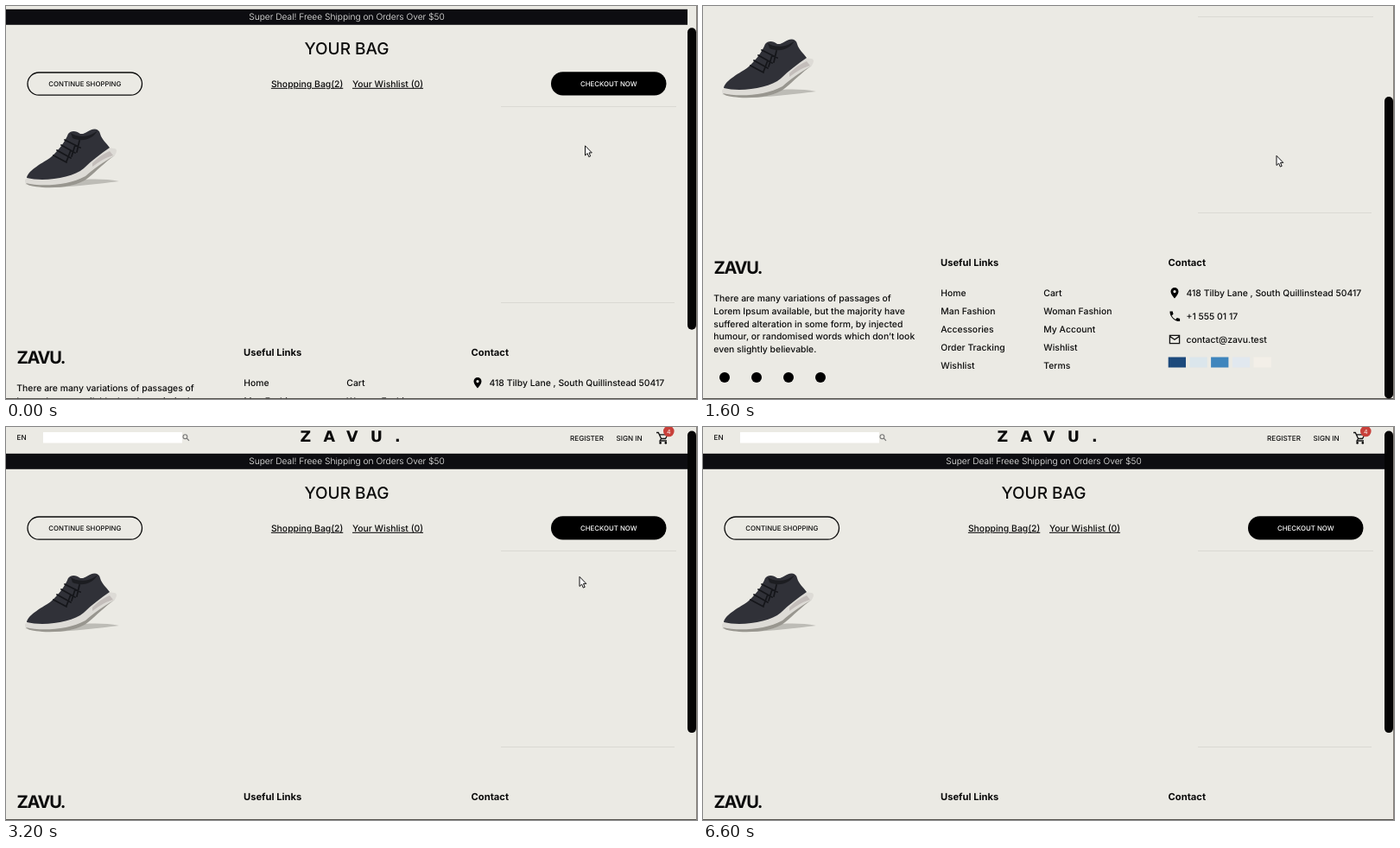
These frames come from a looping animation (800 px wide and 455 px high, 7000 ms). An HTML page:

```html
<!DOCTYPE html>
<html lang="en">
<head>
<meta charset="utf-8">
<title>Your bag</title>
<style>
  html, body { margin: 0; width: 100%; height: 100%; overflow: hidden; background: #ebeae4; }
  svg { display: block; width: 100%; height: 100%; }
  text { font: 500 10.4px Inter, "Open Sans", sans-serif; fill: #0b0b0b; text-rendering: geometricPrecision; }
  .mid { text-anchor: middle; }
  .nav { font-size: 8.1px; }
  .promo { font-size: 10.2px; font-weight: 300; fill: #f1f1ef; }
  .title { font-size: 19px; font-weight: 500; }
  .btn { font-size: 7.8px; }
  .light { fill: #fff; }
  .badge { font-size: 7px; fill: #f3dcd8; }
  .link { text-decoration: underline; }
  .head { font-size: 11.2px; font-weight: 700; }
  .brand { font-size: 20px; font-weight: 700; letter-spacing: -1.3px; }
  .mark { font: 700 17.5px "DejaVu Sans", sans-serif; letter-spacing: 14.2px; }
  .rule { stroke: #dad9d3; stroke-width: 1; }
</style>
</head>
<body>
<svg viewBox="0 0 800 455" preserveAspectRatio="none">
  <rect width="800" height="455" fill="#ebeae4"/>
  <g id="page">
    <!-- navigation -->
    <text class="nav" x="12.5" y="21">EN</text>
    <rect x="43" y="12" width="161" height="12.5" fill="#fff"/>
    <g fill="none" stroke="#777" stroke-width="1.1">
      <circle cx="207.4" cy="17.2" r="2.4"/>
      <path d="M209.2 19 L212 21.8"/>
    </g>
    <text class="mark" x="340.5" y="23">ZAVU.</text>
    <text class="nav" x="653" y="22.3">REGISTER</text>
    <text class="nav" x="706.6" y="22.3">SIGN IN</text>
    <path d="M753 12.5 H755.3 L758.6 19.5 H763.5 L766 14.8 M756.5 14.8 H765 M758.6 19.5 L757 22 H765" fill="none" stroke="#111" stroke-width="1.3"/>
    <circle cx="757.6" cy="24.4" r="1.3"/>
    <circle cx="763.8" cy="24.4" r="1.3"/>
    <circle cx="767.3" cy="11" r="6.3" fill="#c8403a"/>
    <text class="mid badge" x="767.3" y="13.5">4</text>

    <rect y="36.8" width="789" height="18" fill="#0d0d11"/>
    <text class="mid promo" x="394.5" y="49.2">Super Deal! Freee Shipping on Orders Over $50</text>

    <!-- bag -->
    <text class="mid title" x="394.5" y="89">YOUR BAG</text>
    <rect x="25" y="110" width="132.5" height="26.2" rx="13.1" fill="none" stroke="#0b0b0b" stroke-width="1.3"/>
    <text class="mid btn" x="91.3" y="126">CONTINUE SHOPPING</text>
    <text class="mid link" x="348.6" y="126.8">Shopping Bag(2)</text>
    <text class="mid link" x="442" y="126.8">Your Wishlist (0)</text>
    <rect x="631" y="109.3" width="133.5" height="27.2" rx="13.6"/>
    <text class="mid btn light" x="697.8" y="126">CHECKOUT NOW</text>
    <path class="rule" d="M573 149.5 H776 M573 376.5 H774"/>

    <!-- shoe -->
    <path d="M22 239 C50 247 95 240 131 236 C118 233.5 105 233 90 234Z" fill="#bdbcb6"/>
    <path d="M22 235 C23 229 40 234 60 229 C85 222 97 208 117 197 L126 198 Q130 199 126 206 C114 214 105 224 95 232 C84 241 62 244 42 242.5 C30 242 21 241 22 235Z" fill="#dddbd6"/>
    <path d="M23 238 C40 242.5 72 241 92 230 C101 222 112 214 126 206 C114 214 105 224 95 232 C84 242 60 244 42 243 C32 242 25 241 23 238Z" fill="#98968f"/>
    <path d="M100 215 C107 208 113 204 120 201 L124 206 C114 209 107 214 100 219Z" fill="#c3bdba"/>
    <path d="M24 232 C25 223 44 214 52 208 C61 200 68 191 72 181 C75 177 81 177 86 181 C92 182 95 176 103 175.5 Q108 176 109 181 C111 188 116 191 120 197 C110 204 100 211 90 221 C77 232 44 237 24 232Z" fill="#303138"/>
    <path d="M75 180 C81 185 97 186 106 177 C101 187 88 191 77 186Z" fill="#1c1d21"/>
    <path d="M55 206 L70 214 M59 200 L75 209 M64 194 L80 203 M68 188 L86 197 M70 213 L75 200 M76 207 L80 194 M82 202 L85 189" fill="none" stroke="#15161a" stroke-width="1.8" stroke-linecap="round"/>

    <!-- footer -->
    <text class="brand" x="12.5" y="447.3">ZAVU.</text>
    <g id="about"></g>
    <g id="social"></g>
    <text class="head" x="275" y="438.4">Useful Links</text>
    <g id="links"></g>
    <text class="head" x="538.6" y="438.4">Contact</text>
    <path d="M546 463 a4.5 4.5 0 0 1 4.5 4.5 c0 3.4 -4.5 8 -4.5 8 s-4.5 -4.6 -4.5 -8 a4.5 4.5 0 0 1 4.5 -4.5 Z M546 466 a1.6 1.6 0 1 0 .01 0 Z" fill-rule="evenodd"/>
    <path d="M540.5 490.5 h3.2 l.8 3.3 -1.9 1.8 q1.5 3 4.4 4.4 l1.8 -1.9 3.3 .8 v3.2 q-4.8 .2 -8.2 -3.4 q-3.6 -3.6 -3.4 -8.2Z"/>
    <path d="M540.4 518.4 h11.2 v9.2 h-11.2 Z M540.4 519.4 L546 523.2 L551.6 519.4" fill="none" stroke="#111" stroke-width="1.3"/>
    <text x="559.5" y="472.6">418 Tilby Lane , South Quillinstead 50417</text>
    <text x="559.5" y="499.7">+1 555 01 17</text>
    <text x="559.5" y="527">contact@zavu.test</text>
    <g id="cards"></g>
  </g>

  <rect y="454" width="800" height="1" fill="#55534f"/>
  <rect x="799" width="1" height="455" fill="#85807a"/>
  <rect id="thumb" x="789" width="10" height="349.5" rx="5" fill="#050505"/>
  <path id="cursor" d="M0 0 V11.2 L2.6 8.8 L4.3 12.8 L6.2 12 L4.5 8.1 H7.8 Z" fill="#fff" stroke="#111" stroke-width="1" stroke-linejoin="round"/>
</svg>
<script>
const LOOP = 7000, TICK = 200, BAR_RATIO = 0.766;
const $ = id => document.getElementById(id);

function add(parent, tag, attrs, label) {
  const el = document.createElementNS($('page').namespaceURI, tag);
  for (const k in attrs) el.setAttribute(k, attrs[k]);
  if (label) el.textContent = label;
  $(parent).append(el);
}

function column(parent, x, y, step, lines) {
  lines.forEach((line, i) => add(parent, 'text', { x, y: y + i * step }, line));
}

column('about', 12.3, 479, 14.75, [
  'There are many variations of passages of',
  'Lorem Ipsum available, but the majority have',
  'suffered alteration in some form, by injected',
  'humour, or randomised words which don’t look',
  'even slightly believable.'
]);
column('links', 275.3, 472.6, 21, ['Home', 'Man Fashion', 'Accessories', 'Order Tracking', 'Wishlist']);
column('links', 394.3, 472.6, 21, ['Cart', 'Woman Fashion', 'My Account', 'Wishlist', 'Terms']);

for (let i = 0; i < 4; i++) {
  add('social', 'circle', { cx: 25 + i * 37, cy: 567, r: 6 });
}
['#1d4a7c', '#dbe6ec', '#3f86bd', '#e1e8ef', '#f3efe8'].forEach((fill, i) =>
  add('cards', 'rect', { x: 538.7 + i * 24.7, y: 543.5, width: 20.3, height: 12, fill }));

// points: [time, ...values], eased between neighbours
const scrollPath = [[0, 33], [1200, 0], [1600, 137], [1800, 137], [2000, 125], [2400, 6]];
const cursorPath = [[0, 670.5, 161.8], [1200, 664, 173.3], [3800, 664, 173.3], [4400, 748, 180.5]];

function sample(path, t) {
  const i = path.findIndex(p => p[0] > t);
  if (i < 0) return path[path.length - 1].slice(1);
  const a = path[i - 1], b = path[i];
  const k = (t - a[0]) / (b[0] - a[0]);
  const e = k * k * (3 - 2 * k);
  return a.slice(1).map((v, n) => v + (b[n + 1] - v) * e);
}

const start = performance.now();
function draw(now) {
  const t = Math.floor(Math.max(0, now - start) % LOOP / TICK) * TICK;
  const scroll = Math.round(sample(scrollPath, t)[0]);
  $('page').setAttribute('transform', `translate(0 ${-scroll})`);
  $('thumb').setAttribute('y', scroll * BAR_RATIO);
  $('cursor').setAttribute('transform', `translate(${sample(cursorPath, t)})`);
  $('cursor').style.display = t < 4600 ? '' : 'none';
  requestAnimationFrame(draw);
}
draw(start);
</script>
</body>
</html>
```
